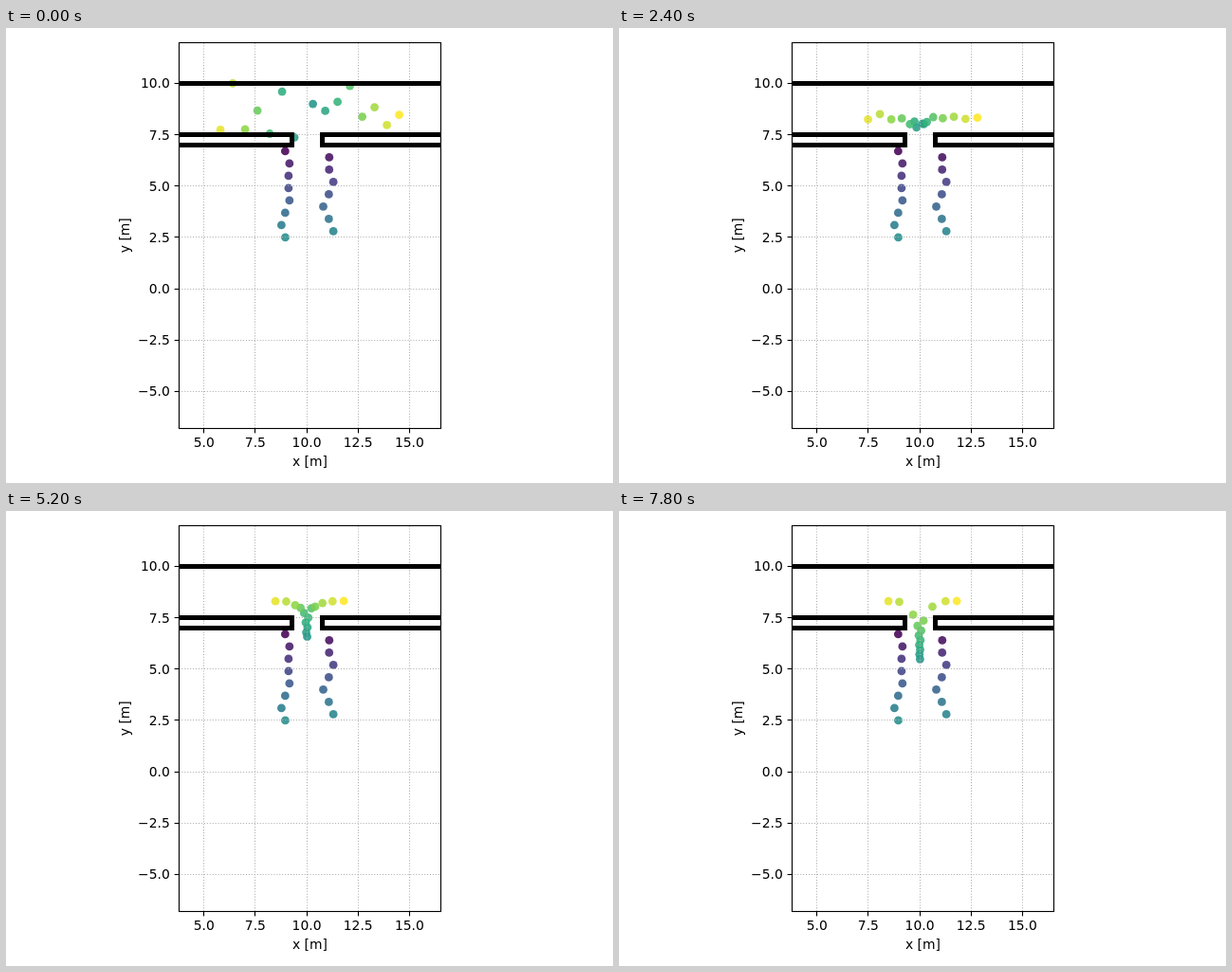
Write an HTML page that moves like this. It is 640 px wide and 480 px high and loops after 8000 ms.

```html
<!DOCTYPE html>
<html lang="en">
<head>
<meta charset="utf-8">
<title>Crowd at a doorway</title>
<style>
  html, body { margin: 0; width: 100%; height: 100%; overflow: hidden; background: #fff; }
  svg { display: block; width: 640px; height: 480px; }
  text { font: 13.89px "DejaVu Sans", sans-serif; }
  .mid { text-anchor: middle; }
  .end { text-anchor: end; }
  #dots { fill-opacity: .87; }
  #grid { stroke: #b0b0b0; stroke-width: 1.11; stroke-dasharray: 1.11 1.83; }
  #walls { fill: none; stroke: #000; stroke-width: 5; }
  #axes { fill: none; stroke: #000; stroke-width: 1.11; }
</style>
</head>
<body>
<svg viewBox="0 0 640 480">
  <clipPath id="plot"><rect x="182" y="15" width="276.5" height="407.5"/></clipPath>
  <g clip-path="url(#plot)">
    <g id="dots"></g>
    <g id="grid"></g>
    <path id="walls" d="M180 58.5H460M180 112.5H301.5V123.5H180M460 112.5H333.5V123.5H460"/>
  </g>
  <g id="axes"><rect x="182.5" y="15.5" width="276" height="407"/></g>
  <g id="labels">
    <text class="mid" x="320.4" y="462">x [m]</text>
    <text class="mid" transform="translate(130 218.7) rotate(-90)">y [m]</text>
  </g>
</svg>
<script>
const LOOP = 8, STEP = 0.2, SCALE = 21.667;
const DOOR_X = 317.1, QUEUE_Y = 95;
const VIRIDIS = [[68, 1, 84], [68, 57, 131], [49, 104, 142], [33, 145, 140],
                 [53, 183, 121], [144, 215, 67], [253, 231, 37]];
const byId = id => document.getElementById(id);
const px = x => 100.4 + SCALE * x;
const py = y => 275.1 - SCALE * y;
const snap = v => Math.floor(v) + 0.5;
const mix = (a, b, k) => a + (b - a) * k;

function add(parent, tag, attrs, content = "") {
  const node = document.createElementNS("http://www.w3.org/2000/svg", tag);
  for (const name in attrs) node.setAttribute(name, attrs[name]);
  node.textContent = content;
  return byId(parent).appendChild(node);
}

function color(rank) {
  const v = rank / 29 * 6, i = Math.min(5, Math.floor(v));
  return `rgb(${VIRIDIS[i].map((c, j) => Math.round(mix(c, VIRIDIS[i + 1][j], v - i)))})`;
}

const dot = (rank, cx, cy) => add("dots", "circle", { cx, cy, r: 4.4, fill: color(rank) });
const line = (parent, x1, y1, x2, y2) => add(parent, "line", { x1, y1, x2, y2 });
const label = (cls, x, y, v) => add("labels", "text", { class: cls, x, y }, v.toFixed(1).replace("-", "\u2212"));

for (let v = 5; v <= 15; v += 2.5) {
  const x = snap(px(v));
  line("grid", x, 422.4, x, 15);
  line("axes", x, 422.5, x, 427.4);
  label("mid", px(v), 442, v);
}
for (let v = -5; v <= 10; v += 2.5) {
  const y = snap(py(v));
  line("grid", 182.4, y, 458.5, y);
  line("axes", 177.6, y, 182.5, y);
  label("end", 172.8, py(v) + 5, v);
}

// Two waiting files below the door, each swaying around its own axis
const sway = (a, slow, fast) => slow * Math.cos(a) + fast * Math.cos(2 * a);
for (let i = 0; i < 15; i++) {
  const k = i >> 1;
  const x = i % 2 ? 341 + sway(0.9 * (k - 4), -2.5, -4)
                  : 296.1 + sway(0.9 * (k - 2.5), 3.5, -2.2);
  dot(15 + i - 15, x, py(6.7 - 0.3 * i));
}

// Walkers alternate right and left of the door; the list holds their starting heights in metres
const walkers = [9, 7.37, 8.66, 9.6, 9.1, 7.55, 9.88, 8.68, 8.38, 7.76, 8.84, 10, 7.97, 7.74, 8.47]
  .map((height, rank) => ({
    rank,
    side: rank % 2 ? -1 : 1,
    distance: 0.3 * (rank + 1) * SCALE,
    y: py(height),
    node: dot(15 + rank, 0, 0)
  }));

function position({ rank, side, distance, y }, t) {
  // Close in on the door, slowing down and keeping a gap to the others
  const advance = 61 * (1 - Math.max(0, 1 - t / 5.2) ** 1.6);
  const gap = 20 * Math.min(1, t / 1.4);
  const rest = distance - advance;
  const spread = (rest + Math.hypot(rest, gap)) / 2;

  // Pass the door one after another
  const flow = 66 * (1 - Math.exp(-Math.max(0, t - 3.7) / 2.6));
  const drop = Math.max(0, flow - 5 * rank);
  const offset = spread / (1 + drop / 10);

  const row = QUEUE_Y + 9 * Math.exp(-((offset / 14) ** 2));
  return [DOOR_X + side * offset, mix(row, y, Math.exp(-t / 1.1)) + drop];
}

function draw() {
  const t = Math.floor(performance.now() / 1000 % LOOP / STEP) * STEP;
  for (const walker of walkers) {
    const [x, y] = position(walker, t);
    walker.node.setAttribute("cx", x);
    walker.node.setAttribute("cy", y);
  }
  requestAnimationFrame(draw);
}
draw();
</script>
</body>
</html>
```
